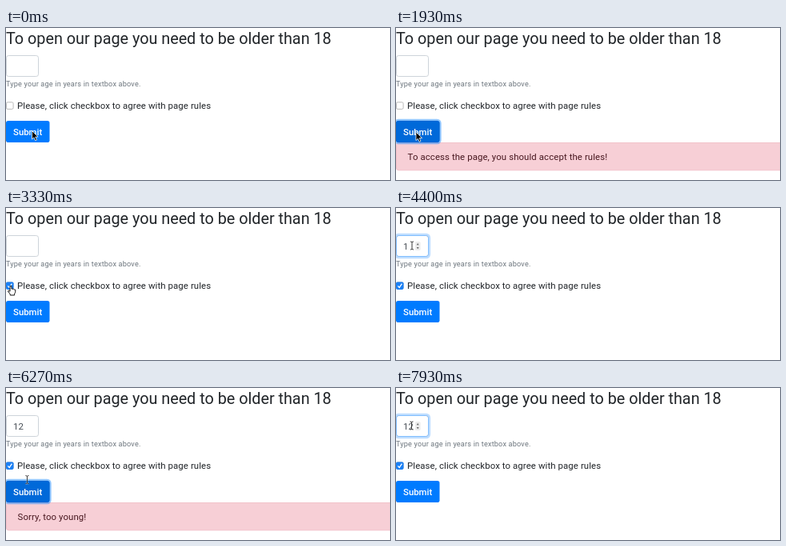
An HTML page that plays this animation: 480 by 190 pixels, repeating every 8 s.

```html
<!DOCTYPE html>
<html lang="en">
<head>
<meta charset="utf-8">
<title>Age check form</title>
<style>
  html, body { margin: 0; width: 100%; height: 100%; overflow: hidden; background: #fff; }
  svg { display: block; width: 480px; height: 190px; }
  text { font: 11.4px Roboto, Inter, sans-serif; letter-spacing: .1px; fill: #212529; white-space: pre; }
  .title { font-size: 19.8px; letter-spacing: 0; }
  .hint { font-size: 9.1px; letter-spacing: .2px; fill: #6c757d; }
  .value { fill: #495057; }
  .caption { font-weight: 500; letter-spacing: 0; fill: #fff; }
  .message { fill: #491820; }
</style>
</head>
<body>
<svg viewBox="0 0 480 190">
  <text class="title" x="0" y="20.4">To open our page you need to be older than 18</text>

  <rect x=".5" y="34.5" width="40" height="26" rx="2.8" fill="#fff" stroke="#ced4da"/>
  <g id="inputFocus" fill="none">
    <rect x="-1" y="33" width="43" height="29" rx="4" stroke="#007bff" stroke-opacity=".25" stroke-width="2.3"/>
    <rect x=".5" y="34.5" width="40" height="26" rx="2.8" stroke="#80bdff"/>
  </g>
  <text id="age" class="value" x="9" y="51.6"></text>
  <g id="spinner">
    <rect x="24" y="42" width="6.5" height="11" rx="1.5" fill="#ececec"/>
    <path d="M25.7 46.2L27.2 44l1.5 2.2zM25.7 49l1.5 2.2 1.5-2.2z" fill="#666"/>
  </g>

  <text class="hint" x="0" y="73.2">Type your age in years in textbox above.</text>

  <rect x=".5" y="92.8" width="8.6" height="8.6" rx="1.6" fill="#fff" stroke="#b4b4b4" stroke-width=".9"/>
  <g id="check">
    <rect x="0" y="92.4" width="9.5" height="9.5" rx="1.8" fill="#1b80f5"/>
    <path d="M2.3 97.4l1.9 2 3.2-4.7" fill="none" stroke="#fff" stroke-width="1.3"/>
  </g>
  <text x="14" y="101">Please, click checkbox to agree with page rules</text>

  <g id="alert">
    <rect x=".5" y="143.5" width="500" height="34.3" rx="2.8" fill="#f7cfd6" stroke="#f3c2ca"/>
    <text id="message" class="message" x="14.6" y="164.8"></text>
  </g>

  <rect x="0" y="116" width="54.5" height="27" rx="2.8" fill="#007bff"/>
  <g id="buttonFocus">
    <rect x="-1" y="115" width="56.5" height="29" rx="4" fill="none" stroke="#268fff" stroke-opacity=".5" stroke-width="2.3"/>
    <rect x=".4" y="116.4" width="53.7" height="26.2" rx="2.5" fill="#0069d9" stroke="#0062cc" stroke-width=".8"/>
  </g>
  <text class="caption" x="9" y="133.7">Submit</text>

  <g id="cursor">
    <path id="arrow" d="M0 0V10.5L2.4 8.3 4.1 12.2 6 11.4 4.3 7.6H7.6Z" fill="#000" stroke="#fff" stroke-width=".8"/>
    <path id="hand" d="M-1 .8Q0-.6 1 .8V4.2Q2 3.4 2.7 4.5 3.8 3.8 4.3 4.9 5.8 4.5 5.8 6.2 6 9 4.6 10.2V12H-.8V10.8L-3.6 6.9Q-3.4 5.4-1 7.2Z"
      fill="#fff" stroke="#111" stroke-width="1" stroke-linejoin="round"/>
    <g id="beam" fill="none">
      <path d="M-2-5Q0-5 0-4 0-5 2-5M0-4V4M-2 5Q0 5 0 4 0 5 2 5" stroke="#fff" stroke-opacity=".6" stroke-width="1.8"/>
      <path d="M-2-5Q0-5 0-4 0-5 2-5M0-4V4M-2 5Q0 5 0 4 0 5 2 5" stroke="#222" stroke-width=".9"/>
    </g>
  </g>
</svg>
<script>
  const LOOP = 8000, STEP = 200 / 3, FADE = 150;

  // time, x, y, pointer shape from that time on
  const path = [
    [0, 32.5, 128.5, 'arrow'],
    [400, 32.5, 128.5, 'arrow'],
    [1070, 25.5, 131, 'arrow'],
    [1866, 25.5, 131, 'arrow'],
    [2460, 11, 104, 'hand'],
    [2600, 10, 101.8, 'hand'],
    [2800, 6, 97, 'hand'],
    [3330, 6, 97, 'hand'],
    [3600, 15, 63, 'beam'],
    [3730, 18, 53, 'beam'],
    [3800, 18, 53, 'beam'],
    [4200, 20, 47, 'beam'],
    [4660, 20, 47, 'beam'],
    [5200, 27, 127, 'beam'],
    [5530, 27, 132, 'beam'],
    [5730, 27, 132, 'beam'],
    [6070, 27, 120, 'beam'],
    [6200, 27, 120, 'beam'],
    [6600, 19.5, 47, 'beam'],
    [LOOP, 19.5, 47, 'beam']
  ];
  const focus = {
    buttonFocus: [[1100, 3070], [5730, 6930]],
    inputFocus: [[3930, 5730], [6930, 2 * LOOP]]
  };
  const alerts = [
    [1330, 3190, 'To access the page, you should accept the rules!'],
    [5930, 7725, 'Sorry, too young!']
  ];

  const $ = id => document.getElementById(id);
  const clamp = v => Math.min(1, Math.max(0, v));
  const ease = v => v * v * (3 - 2 * v);
  const ramp = (t, start) => ease(clamp((t - start) / FADE));
  const show = (id, on) => $(id).setAttribute('opacity', +on);

  function draw(t) {
    for (const id in focus)
      show(id, Math.max(...focus[id].map(([a, b]) => ramp(t, a) - ramp(t, b))));

    const alert = alerts.find(([a, b]) => t >= a && t < b);
    show('alert', !!alert);
    $('message').textContent = alert ? alert[2] : '';
    show('check', t >= 3190);
    $('age').textContent = t < 4390 ? '' : t < 4590 ? '1' : '12';

    const i = path.findLastIndex(p => p[0] <= t);
    const [t0, x0, y0, shape] = path[i];
    const [t1, x1, y1] = path[i + 1];
    const k = ease((t - t0) / (t1 - t0));
    const x = x0 + (x1 - x0) * k, y = y0 + (y1 - y0) * k;
    $('cursor').setAttribute('transform', `translate(${x} ${y})`);
    for (const id of ['arrow', 'hand', 'beam']) show(id, id === shape);
    show('spinner', x < 41 && y > 34 && y < 61);
  }

  const start = performance.now();
  function tick() {
    const t = (performance.now() - start) % LOOP;
    draw(Math.min(LOOP - 1, Math.floor((t + 4) / STEP) * STEP));
    requestAnimationFrame(tick);
  }
  tick();
</script>
</body>
</html>
```
